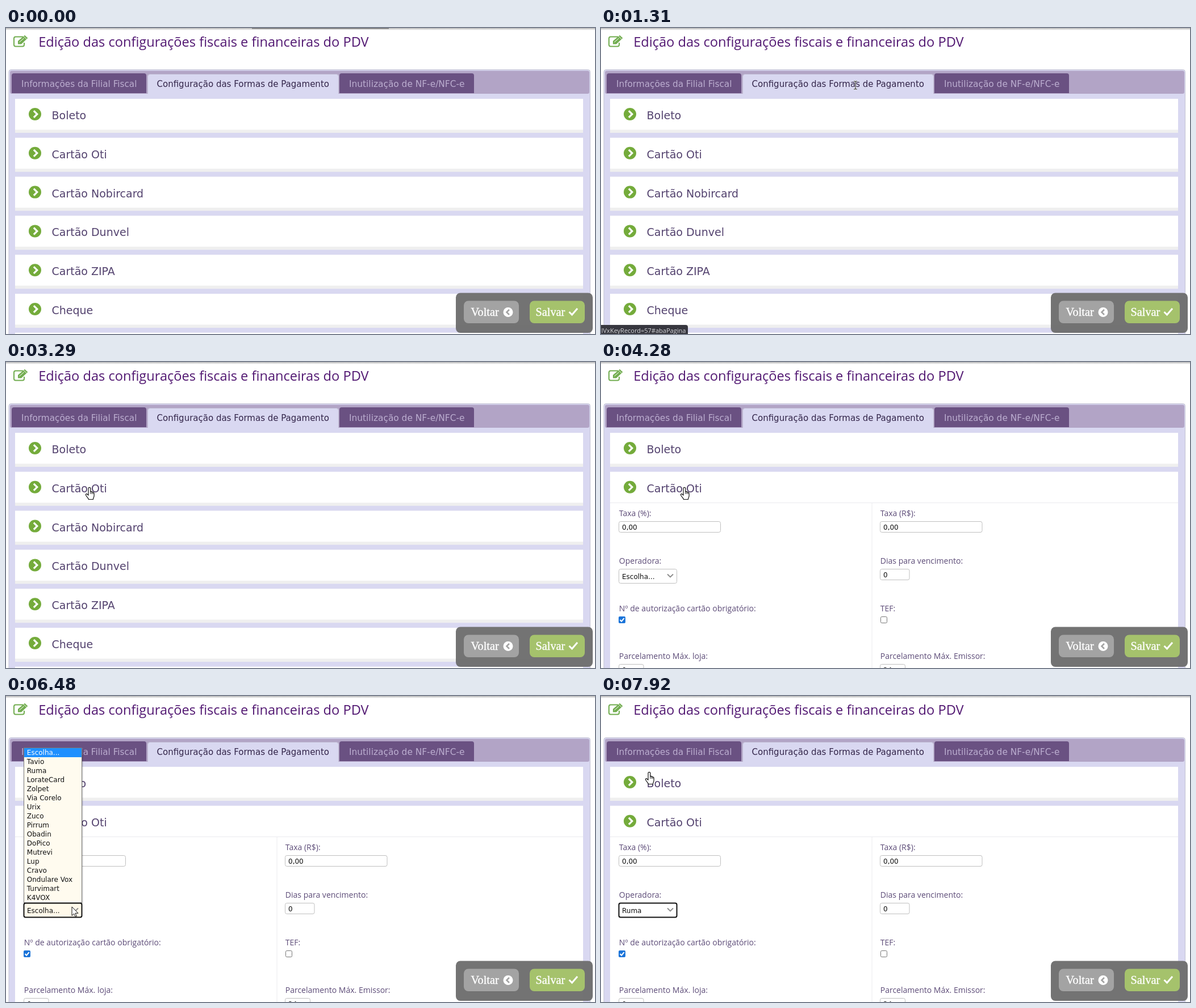
An HTML page for the animation above (8000 ms loop, 1037 by 540 pixels).

```html
<!DOCTYPE html>
<html lang="pt-BR">
<head>
<meta charset="utf-8">
<title>Formas de pagamento</title>
<style>
  html, body { margin: 0; width: 100%; height: 100%; overflow: hidden; background: #fff; }
  svg { display: block; }
  text { white-space: pre; }
  .sans { font-family: "Open Sans", "Noto Sans", sans-serif; }
  .ui { font-family: "DejaVu Sans", Verdana, sans-serif; }
  .slab { font-family: "Liberation Serif", serif; stroke: #fff; stroke-width: .35px; }
</style>
</head>
<body>
<svg id="stage" width="1037" height="540" viewBox="0 0 1037 540"></svg>
<script>
const LOOP = 8000, STEP = 110;
const GREEN = '#74ab3b', INK = '#54436f', LAVENDER = '#d9d8f1';
const CARDS = ['Boleto', 'Cartão Oti', 'Cartão Nobircard', 'Cartão Dunvel', 'Cartão ZIPA', 'Cheque', ''];
const OPTIONS = ['Escolha...', 'Tavio', 'Ruma', 'LorateCard', 'Zolpet', 'Via Corelo', 'Urix', 'Zuco',
  'Pirrum', 'Obadin', 'DoPico', 'Mutrevi', 'Lup', 'Cravo', 'Ondulare Vox', 'Turvimart', 'K4VOX'];
const LIST_TOP = 92, OPTION_H = 16;

const rect = (x, y, w, h, fill, extra = '') =>
  `<rect x="${x}" y="${y}" width="${w}" height="${h}" fill="${fill}" ${extra}/>`;
const text = (x, y, s, size, fill, font = 'ui', extra = '') =>
  `<text x="${x}" y="${y}" font-size="${size}" fill="${fill}" class="${font}" ${extra}>${s}</text>`;
const line = (d, color, width = 2, extra = '') =>
  `<path d="${d}" fill="none" stroke="${color}" stroke-width="${width}" ${extra}/>`;
const group = (id, body) => `<g id="${id}">${body}</g>`;

function tab(x, y, w, label, size, active) {
  const h = 115 - y + (active ? 2 : 0);
  return `<path d="M${x} ${y + h}v${4 - h}q0-4 4-4h${w - 8}q4 0 4 4v${h - 4}z" fill="${active ? LAVENDER : '#6a5182'}"
    stroke="${active ? '#bdb8d0' : 'none'}"/>` +
    (active ? rect(x - 1, 116, w + 2, 3, LAVENDER) : '') +
    text(x + (active ? 16 : 17), 103.5, label, size, active ? '#33254a' : '#bcaed0');
}

function header(i) {
  const y = 125 + 68.8 * i;
  return rect(16, y, 1000, 60, '#efefef') + rect(16, y, 1000, 54.5, '#fff') +
    `<circle cx="51" cy="${y + 27}" r="11" fill="${GREEN}"/>` +
    line(`M48.9 ${y + 21.1}l5.9 5.9-5.9 5.9`, '#fff', 3.2) +
    text(80.5, y + 36, CARDS[i], 19, INK);
}

const label = (x, y, s) => text(x + .8, y, s, 14, '#5d4c78', 'sans');
const input = (x, y, w, value) =>
  rect(x + .5, y + .5, w - 1, 19, '#fff', 'rx="3" stroke="#bfbfbf"') + text(x + 6, y + 15, value, 12, '#111');

function form() {
  return rect(16, 248, 1000, 292, '#fff') + rect(16, 248, 1000, 1, '#e9e9ee') + rect(476.5, 248, 1, 292, '#ececf0') +
    label(31, 272, 'Taxa (%):') + input(31, 281, 180, '0,00') +
    label(491, 272, 'Taxa (R$):') + input(491, 281, 180.5, '0,00') +
    label(31, 356, 'Operadora:') +
    rect(31.5, 365.5, 102, 25, '#fff', 'id="box" rx="3"') +
    text(37, 382.5, '', 12, '#111', 'ui', 'id="choice"') +
    line('M117 374.5l5 5 5-5', '#8a8a8a', 1.8) +
    label(491, 356, 'Dias para vencimento:') + input(491, 365, 52.5, '0') +
    label(31, 440, 'Nº de autorização cartão obrigatório:') +
    rect(31, 449, 12, 12, '#1b74d9', 'rx="2"') + line('M33.5 455l2.6 2.7 4.6-5.6', '#fff', 2) +
    label(491, 440, 'TEF:') + rect(492.5, 449.5, 11, 11, '#fff', 'rx="2" stroke="#767676"') +
    label(31, 524, 'Parcelamento Máx. loja:') + input(31, 533, 44.5, '0') +
    label(491, 524, 'Parcelamento Máx. Emissor:') + input(491, 533, 45, '24');
}

function list() {
  return rect(33, 94, 103, 273, '#000', 'opacity=".12"') +
    rect(31.5, LIST_TOP - .5, 102, 273, '#fffbef', 'stroke="#777"') +
    rect(32, LIST_TOP, 101, OPTION_H, '#1e90ff', 'id="glow"') +
    OPTIONS.map((s, i) => text(36.8, LIST_TOP + 12 + OPTION_H * i, s, 12, '#111', 'ui', 'data-option')).join('');
}

function buttons() {
  return rect(792, 467.5, 241, 70.5, '#6f6f6f', 'rx="8" opacity=".97"') +
    rect(806, 481.5, 97, 39.5, '#a3a3a3', 'rx="8"') + text(818.5, 508, 'Voltar', 20.3, '#fff', 'slab') +
    '<circle cx="884" cy="501.5" r="8.5" fill="#fff"/>' + line('M886 497l-4.5 4.5 4.5 4.5', '#a3a3a3', 2.6) +
    rect(922, 481.5, 97, 39.5, '#a5c26c', 'rx="8"') + text(932.5, 508, 'Salvar', 20.3, '#fff', 'slab') +
    line('M991.5 501l5 5 9.5-11', '#fff', 3);
}

const outline = 'stroke="#111" stroke-linejoin="round"';
const beam = 'M-3-7h2l1 1 1-1h2M0-6V6M-3 7h2l1-1 1 1h2';
const cursors =
  group('arrow', `<path d="M0 0V15.5L3.7 12.2 6.2 17.5 8.4 16.5 6 11.3H11Z" fill="#fff" ${outline}/>`) +
  group('hand', `<path d="M-2 1.2a1.9 1.9 0 0 1 3.8 0V7c.8-.9 2-.7 2.3.5.8-.7 1.9-.3 2.1.8
    1-.5 1.9.2 1.9 1.5V14c0 2.5-1.5 3.5-1.7 6.5H-1.5c-.5-2.2-3.2-4.2-4.9-7.5-1-2 1-3 2.4-1.7L-2 13.2Z"
    fill="#fff" ${outline} stroke-width="1.2"/>` + line('M1.8 7v4M4.1 8v3M6.2 9v2', '#111', .9)) +
  group('beam', line(beam, '#fff', 2.6) + line(beam, '#222', 1.1));

document.getElementById('stage').innerHTML =
  `<defs><linearGradient id="shade" x2="0" y2="1"><stop stop-color="#b5b5b5"/>
   <stop offset="1" stop-color="#fff"/></linearGradient></defs>` +
  rect(0, 0, 1037, 540, '#fff') + rect(0, 0, 1037, 4, 'url(#shade)') +
  group('topbar', rect(433, 0, 241, 1.5, '#777')) +
  line('M30 15.5H17q-3 0-3 3V29.5q0 3 3 3H29q3 0 3-3V26', '#72ad50', 2) +
  '<path d="M21 28.5V23L33 12.7l5.3 5L27 28.5Z" fill="#72ad50"/>' +
  line('M31 14.5l5 5M23.5 25l8-7', '#fff', 1) +
  text(57.2, 32.5, 'Edição das configurações fiscais e financeiras do PDV', 23.6, '#521872', 'sans') +
  rect(5, 73.5, 1023.5, 480, LAVENDER, 'rx="4" stroke="#c3c3d3"') +
  rect(7, 75.5, 1020, 40.5, '#b2a4c6', 'rx="3"') +
  tab(10, 80, 237, 'Informações da Filial Fiscal', 15.25, false) +
  tab(249.5, 81.5, 336, 'Configuração das Formas de Pagamento', 15, true) +
  tab(587, 80, 237, 'Inutilização de NF-e/NFC-e', 15.4, false) +
  CARDS.map((_, i) => header(i)).join('') +
  group('form', form()) + group('list', list()) + buttons() +
  group('status', `<path d="M0 524h149q4 0 4 4v12H0z" fill="#37373f"/>` +
    text(-2, 538, 'ilVxKeyRecord=57#abaPagina', 11, '#d5d5da', 'sans')) +
  group('cursor', cursors);

const el = id => document.getElementById(id);
const show = (id, on) => el(id).setAttribute('visibility', on ? 'inherit' : 'hidden');
const options = [...document.querySelectorAll('[data-option]')];

const smooth = p => p * p * (3 - 2 * p);
const easeIn = p => p ** 1.2;
const easeOut = p => 1 - (1 - p) ** 2;

// start, steps, end x, end y, easing
const MOVES = [
  [440, 8, 448, 101, easeOut],
  [2190, 6, 225, 195, easeIn],
  [2850, 5, 147, 222, easeOut],
  [4940, 7, 119, 376, smooth],
  [6040, 2, 116, 372, smooth],
  [6600, 8, 85, 135, smooth]
];

const stepped = (t, start, n) => Math.min(n, Math.max(0, Math.floor((t - start) / STEP + 1.001))) / n;

function pointer(t) {
  let x = 560, y = -12;
  for (const [start, n, toX, toY, ease] of MOVES) {
    const p = ease(stepped(t, start, n));
    x += (toX - x) * p;
    y += (toY - y) * p;
  }
  return [x, y];
}

function shape(x, y, listed, opened) {
  if (listed || y < 80) return 'arrow';
  if (y < 116) return x > 250 && x < 585 ? 'beam' : 'hand';
  const inRow = (y - 125) % 68.8;
  return y > 125 && inRow > 2 && inRow < 55 && !(opened && y > 248) ? 'hand' : 'arrow';
}

function draw(t) {
  const opened = t >= 4280, listed = t >= 6480 && t < 7920, chosen = t >= 7920;
  const [x, y] = pointer(t);
  const kind = shape(x, y, listed, opened);

  show('topbar', t < 440);
  show('cursor', t >= 440);
  el('cursor').setAttribute('transform', `translate(${x.toFixed(1)} ${y.toFixed(1)})`);
  for (const id of ['arrow', 'hand', 'beam']) show(id, id === kind);

  el('status').setAttribute('opacity', stepped(t, 1090, 3) - stepped(t, 2630, 4));

  show('form', opened);
  const hover = x > 31 && x < 134 && y > 365 && y < 391;
  const focus = listed || chosen;
  const box = el('box');
  box.setAttribute('fill', hover || listed ? '#fff9ea' : '#fff');
  box.setAttribute('stroke', focus ? '#111' : hover ? '#8a6bb5' : '#bfbfbf');
  box.setAttribute('stroke-width', focus ? 2 : 1);
  el('choice').textContent = OPTIONS[chosen ? 2 : 0];

  show('list', listed);
  const over = Math.floor((y - LIST_TOP) / OPTION_H);
  const lit = over < OPTIONS.length ? over : 0;
  el('glow').setAttribute('y', LIST_TOP + OPTION_H * lit);
  options.forEach((o, i) => o.setAttribute('fill', i === lit ? '#fff' : '#111'));
}

const began = performance.now();
function tick() {
  draw((performance.now() - began) % LOOP);
  requestAnimationFrame(tick);
}
tick();
</script>
</body>
</html>
```
